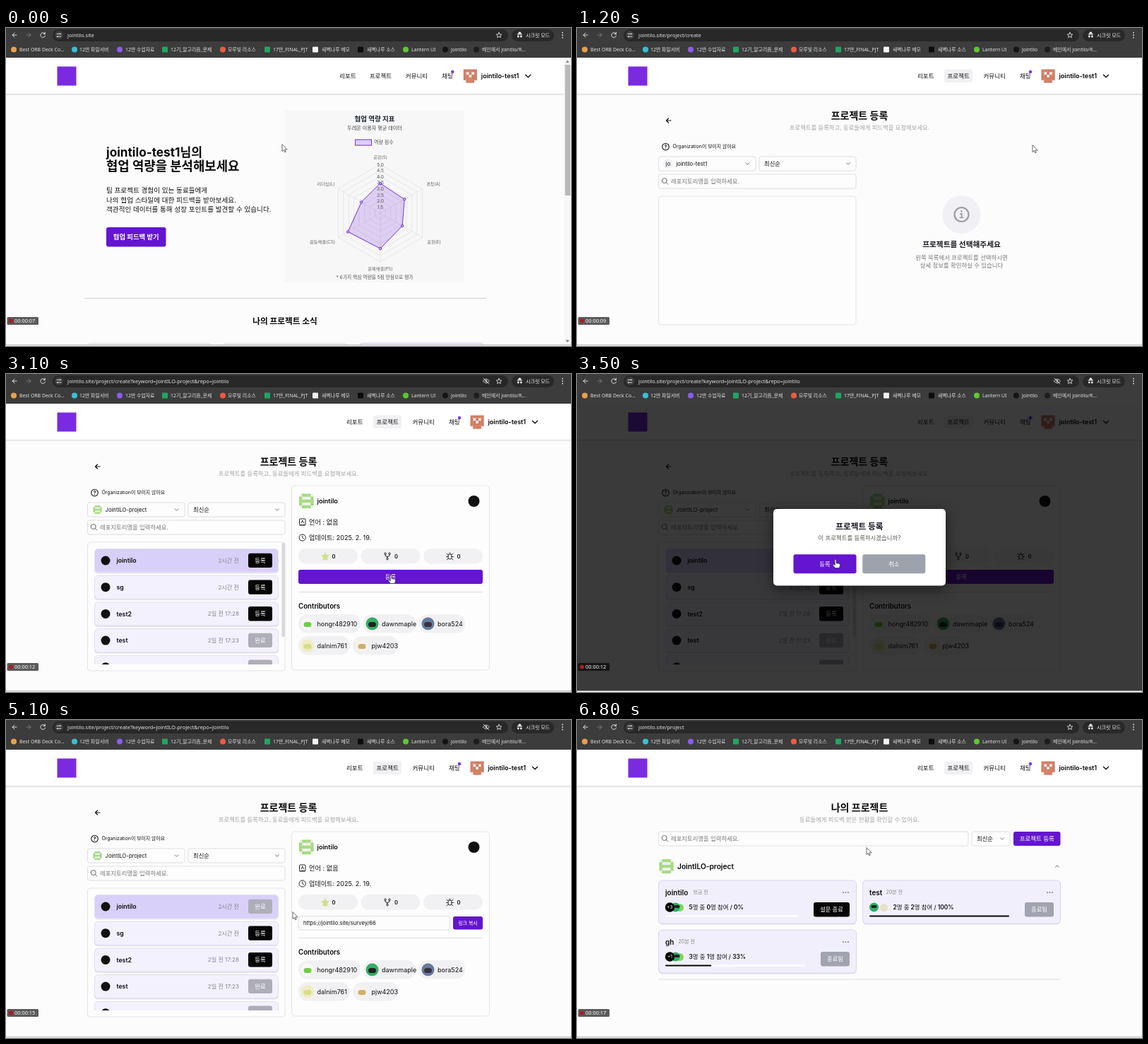
These frames come from a looping animation (800 by 450 pixels, 6.9 s). An HTML page:

```html
<!DOCTYPE html>
<html lang="ko">
<head>
<meta charset="utf-8">
<style>
html, body { margin: 0; width: 100%; height: 100%; overflow: hidden; background: #fcfcfc; }
svg { display: block; width: 800px; height: 450px; font-family: Inter, "Noto Sans CJK KR", sans-serif; }
.ui { font-family: "Noto Sans", "Noto Sans CJK KR", sans-serif; }
.raised { filter: drop-shadow(0 5px 9px rgba(0, 0, 0, .5)); }
</style>
</head>
<body>
<svg id="stage" viewBox="0 0 800 450" xmlns="http://www.w3.org/2000/svg"></svg>
<script>
const LOOP = 6900, STEP = 100;
const BRAND = 'jointilo', USER = BRAND + '-test1', ORG = 'JointILO-project', SITE = BRAND + '.site';
const PURPLE = '#6415cf', BLACK = '#050505', GREY = '#a1a3b0', LINE = '#dedee2', MUTED = '#777';
const stage = document.getElementById('stage');

// Drawing helpers
const rect = (x, y, w, h, fill, r = 0, more = '') =>
  `<rect x="${x}" y="${y}" width="${w}" height="${h}" rx="${r}" fill="${fill}" ${more}/>`;
const box = (x, y, w, h, stroke = LINE, fill = '#fdfdfd', r = 3) =>
  rect(x, y, w, h, fill, r, `stroke="${stroke}"`);
const dot = (x, y, r, fill, more = '') => `<circle cx="${x}" cy="${y}" r="${r}" fill="${fill}" ${more}/>`;
const path = (d, stroke = '#222', w = 1, fill = 'none') =>
  `<path d="${d}" fill="${fill}" stroke="${stroke}" stroke-width="${w}" stroke-linecap="round" stroke-linejoin="round"/>`;
const text = (x, y, s, size, fill = '#111', weight = 400, anchor = 'start', cls = '') =>
  `<text x="${x}" y="${y}" font-size="${size}" fill="${fill}" font-weight="${weight}" text-anchor="${anchor}" class="${cls}">${s}</text>`;
const mid = (x, y, s, size, fill, weight) => text(x, y, s, size, fill, weight, 'middle');
const ui = (x, y, s, size, fill) => text(x, y, s, size, fill, 400, 'start', 'ui');
const at = (x, y, s) => `<g transform="translate(${x} ${y})">${s}</g>`;
const button = (x, y, w, h, label, fill, size = 8.3, weight = 500) =>
  rect(x, y, w, h, fill, 3) + mid(x + w / 2, y + h / 2 + size * .36, label, size, '#fff', weight);
const chevron = (x, y, s = 2.5, w = .9, color = '#666') =>
  path(`M${x - Math.abs(s)} ${y - s / 2}l${Math.abs(s)} ${s}l${Math.abs(s)} ${-s}`, color, w);

function blocks(x, y, size, rows, color) {
  const c = size / 5;
  let s = rect(x, y, size, size, '#f0f0f0', 3);
  rows.split(' ').forEach((row, j) => [...row].forEach((v, i) => {
    if (v === '1') s += rect(x + i * c, y + j * c, c + .1, c + .1, color);
  }));
  return s;
}
const userIcon = (x, y) => blocks(x, y, 19, '11111 10101 11011 11111 01110', '#d27c62');
const orgIcon = (x, y, size) => blocks(x, y, size, '01110 10001 11111 10001 01110', '#a4da7e');

function browser(url, eye) {
  const marks = [
    [11, '#e9a04a', 0, 'Best ORB Deck Co...'], [97, '#38bfd8', 0, '12반 파일서버'],
    [161, '#8b5cf0', 0, '12반 수업자료'], [225, '#21a464', 1, '12기_알고리즘_문제'],
    [307, '#ee5b3f', 0, '모루빛 리소스'], [370, '#21a464', 1, '17반_FINAL_PJT'],
    [438, '#f4f4f4', 1, '새벽나루 메모'], [502, '#0c0c0c', 1, '새벽나루 소스'],
    [566, '#5cc832', 0, 'Lantern UI'], [622, '#141414', 0, BRAND],
    [666, '#1d1d1d', 0, `메인에서 ${BRAND}/R...`]];
  const textX = [19, 104, 169, 233, 314, 378, 447, 511, 574, 630, 674];
  let s = rect(0, 0, 800, 42, '#3c3c3c') + rect(66, 2, 645, 17, '#282828', 8.5) + rect(716, 2, 60, 17, '#292929', 8.5);
  s += path('M15 10H9M12 7l-3 3l3 3', '#ddd') + path('M29 10h6M32 7l3 3l-3 3', '#777');
  s += path('M55 8a3.4 3.4 0 1 0 .5 3M55.4 6v2.4h-2.4', '#ddd');
  s += dot(75, 10, 6, '#3c3c3c') + path('M72 8.3h3M77.4 8.3h.6M72 12h.6M75 12h3', '#ddd') + dot(76.3, 8.3, 1, '#ddd') + dot(73.4, 12, 1, '#ddd');
  s += ui(87, 12.7, url, 7.35, '#e6e6e6');
  if (eye) s += path('M675.5 10q4.5-6 9 0q-4.5 6-9 0M676 6l8 8', '#ddd', .9) + dot(680, 10, 1.4, '#ddd');
  s += path('M698 6.3l1.1 2.5 2.7.2-2.1 1.8.7 2.7-2.4-1.5-2.4 1.5.7-2.7-2.1-1.8 2.7-.2z', '#ddd', .9);
  s += path('M724 9h6.5M725.5 8.5l.8-2.5h2.2l.8 2.5', '#eee', 1, '#eee') + dot(725.3, 12, 1.4, '#eee') + dot(729.3, 12, 1.4, '#eee');
  s += ui(736, 12.7, '시크릿 모드', 7, '#eee');
  s += [6.5, 10, 13.5].map(y => dot(788, y, .9, '#ddd')).join('');
  marks.forEach(([x, c, square, label], i) => {
    s += square ? rect(x - 4, 26.5, 8, 8, c, 1) : dot(x, 30.5, 4, c);
    s += ui(textX[i], 33, label, 6.9, '#e2e2e2');
  });
  return s;
}

function ping(t) {
  const start = t < 600 ? -467 : t < 5700 ? 633 : 5650;
  const p = Math.min(1, ((t - start) % 667 + 667) % 667 / 500), e = 1 - (1 - p) ** 3;
  return dot(642, 62, 2.3 * (1 + e), '#a855f7', `opacity="${(1 - e) * .75}"`);
}

function header(t, home) {
  let s = rect(0, 93, 800, 1, '#dcdcdc') + rect(0, 94, 800, 1.5, '#f1f1f1') + rect(0, 42, 800, 51, '#fff');
  s += rect(72.5, 54.5, 27, 27, '#7a2be0');
  let nav = home ? '' : rect(520, 58.5, 40, 18.5, '#f1f1f4', 3);
  [[482, '리포트'], [524.5, '프로젝트'], [575.5, '커뮤니티'], [627, '채팅']].forEach(([x, label]) => {
    nav += text(x, 71, label, 8.5, '#111', 500);
  });
  nav += ping(t) + dot(642, 62, 2.3, '#7c3aed') + userIcon(657.5, 58.5);
  nav += text(682.5, 71.2, USER, 9, '#050505', 600) + chevron(749, 68, 3.6, 1.4, '#111');
  return s + at(home ? -9.7 : 0, 0, nav);
}

function radar() {
  const cx = 530, cy = 262;
  const spot = (r, i) => [cx + r * Math.sin(i * Math.PI / 3), cy - r * Math.cos(i * Math.PI / 3)];
  const ring = rs => 'M' + rs.map((r, i) => spot(r, i).map(v => v.toFixed(1)).join(' ')).join('L') + 'z';
  const data = [42, 39.5, 36, 50, 53, 31];
  let s = '';
  for (let k = 1; k <= 8; k++) s += path(ring(Array(6).fill(k * 8.6)), '#dcdce0', .6);
  for (let i = 0; i < 6; i++) s += path(`M${cx} ${cy}L${spot(69, i).join(' ')}`, '#dcdce0', .6);
  s += path(ring(data), '#7431d6', 1, 'rgba(116,49,214,.2)');
  data.forEach((r, i) => { const [x, y] = spot(r, i); s += dot(x, y, 1.7, '#c9b4f0', 'stroke="#7431d6"'); });
  for (let k = 1; k <= 8; k++) s += mid(cx, cy - k * 8.6 + 2.3, (1 + k / 2).toFixed(1), 6.6, '#555');
  [[530, 184.5, '공감(S)'], [605, 222.5, '경청(A)'], [606, 305, '표현(E)'], [530, 343, '문제해결(PS)'],
   [448, 305, '갈등해결(CS)'], [453, 222.5, '리더십(L)']].forEach(([x, y, label]) => { s += mid(x, y, label, 6.2, '#666'); });
  return s;
}

function home() {
  let s = text(142, 182, USER + '님의', 17.2, '#0a0a0a', 700) + text(142, 201.5, '협업 역량을 분석해보세요', 17.8, '#0a0a0a', 700);
  s += text(142, 233, '팀 프로젝트 경험이 있는 동료들에게', 9.6) + text(142, 246.7, '나의 협업 스타일에 대한 피드백을 받아보세요.', 9.6);
  s += text(142, 260.2, '객관적인 데이터를 통해 성장 포인트를 발견할 수 있습니다.', 9.6);
  s += button(142, 282, 84.5, 27.5, '협업 피드백 받기', PURPLE, 9.4, 700);
  s += rect(395, 116, 253.5, 244, '#f7f7f8', 2);
  s += mid(522, 131.7, '협업 역량 지표', 9.5, '#1f2430', 700) + mid(522, 144.3, '두레온 이용자 평균 데이터', 7.1, '#444');
  s += rect(494.5, 158, 23, 8, '#dccff4', 0, 'stroke="#7431d6"') + text(521, 164.3, '역량 점수', 7, '#555') + radar();
  s += mid(522, 355.3, '* 6가지 핵심 역량을 5점 만점으로 평가', 6.7, '#555');
  s += rect(111, 382, 569, 1, '#cfcfd2') + mid(395, 419, '나의 프로젝트 소식', 11.7, '#0a0a0a', 700);
  s += [115.5, 308, 501].map((x, i) => box(x, 446, 174.5, 20, i > 1 ? '#cfc0f2' : '#e0e0e4', i > 1 ? '#f6f2fe' : '#f2f2f4', 4)).join('');
  s += rect(790, 42, 10, 408, '#f7f7f7') + rect(791.5, 52, 7.5, 185, '#b9b9b9');
  s += path('M793 48.5l2-2.5l2 2.5z', '#777', .5, '#777') + path('M793 442l2 2.5l2-2.5z', '#777', .5, '#777');
  return s;
}

const search = w => box(115.5, 207, w, 20) + dot(123.7, 216, 3.5, 'none', 'stroke="#666"') +
  path('M126.3 218.6l2.5 2.5', '#666') + text(133, 219.7, '레포지토리명을 입력하세요.', 8.35, MUTED);
const title = (s, sub) => mid(400, 128.8, s, 14, '#0a0a0a', 700) + mid(400, 144, sub, 8.35, '#a5a5aa');

function projectCard(x, y, p) {
  let s = rect(x, y + 1.5, 280, 61, '#e3e1ea', 5) + box(x, y, 280, 61, '#dbd4ee', '#f2effd', 5);
  s += text(x + 9.5, y + 20.5, p.name, 10, '#0a0a0a', 600) + text(x + p.timeX, y + 19, p.time, 7, '#888');
  s += [261.5, 265, 268.5].map(d => dot(x + d, y + 17, .9, '#777')).join('');
  s += dot(x + 30, y + 38.5, 5.5, p.more ? '#7ed957' : '#e7dfc8') + dot(x + (p.more ? 24 : 16), y + 38, 6.5, '#35ad67');
  s += rect(x + (p.more ? 22 : 12), y + 35, 8, 4, '#222', 2);
  if (p.more) s += dot(x + 16, y + 38, 6.7, BLACK) + mid(x + 16, y + 40.3, p.more, 6.5, '#fff');
  const b = v => `<tspan font-weight="600">${v}</tspan>`;
  s += text(x + 43, y + 41, `${b(p.all)}명 중 ${b(p.done)}명 참여 / ${b(p.pct + '%')}`, 8.4, '#111', 500);
  const w = p.open ? 188 : 198;
  s += rect(x + 9.5, y + 49.5, w, 2, '#fff', 1) + rect(x + 9.5, y + 49.5, w * p.pct / 100, 2, BLACK, 1);
  return s + (p.open ? button(x + 219.5, y + 31, 51, 20.5, '설문 종료', BLACK) : button(x + 229.5, y + 31, 41, 20.5, '종료됨', GREY));
}

function projects(registered) {
  const fresh = { name: BRAND, time: '방금 전', timeX: 49, more: '+3', all: 5, done: 0, pct: 0, open: true };
  const list = [{ name: 'test', time: '20분 전', timeX: 33, all: 2, done: 2, pct: 100 },
    { name: 'gh', time: '20분 전', timeX: 28, more: '+1', all: 3, done: 1, pct: 33 }];
  if (registered) list.unshift(fresh);
  let s = title('나의 프로젝트', '동료들에게 피드백 받은 현황을 확인할 수 있어요.');
  s += at(0, -49, search(438.5)) + box(559, 158, 54, 20) + text(566, 171, '최신순', 8.3) + chevron(602, 168);
  s += button(618, 158, 66.5, 20, '프로젝트 등록', PURPLE, 8.5);
  s += orgIcon(116.5, 197, 20) + text(142, 210.7, ORG, 10.2, '#0a0a0a', 600) + chevron(680, 207, -2.5, 1);
  list.forEach((p, i) => { s += projectCard(i % 2 ? 404.5 : 115.5, i < 2 ? 227 : 297, p); });
  return s + rect(115, registered ? 366.5 : 297, 569.5, 1, '#dededf');
}

function repoList(t) {
  const rows = [[BRAND, '2시간 전'], ['sg', '2시간 전'], ['test2', '2일 전 17:28'], ['test', '2일 전 17:23'], ['gh', '2일 전 17:20']];
  let s = '';
  rows.forEach(([name, when], i) => {
    const y = 247.5 + i * 37.7, done = i > 2 || (i === 0 && t >= 5000);
    const fill = i ? '#f4f1fe' : t >= 2600 ? '#d9d0f9' : t >= 2300 ? '#ece4fc' : '#f4f1fe';
    s += rect(125, y + 1.5, 261, 33.5, '#e6e3ed', 5) + box(125.5, y, 260, 33, '#e2ddf2', fill, 5);
    s += dot(141, y + 16.5, 6.5, '#111') + text(156.5, y + 19.6, name, 8.7, '#0a0a0a', 600);
    s += text(330, y + 19.3, when, 8.1, '#85858d', 400, 'end');
    s += button(343, y + 6.2, 34, 20.3, done ? '완료' : '등록', done ? '#aeaeb9' : BLACK);
  });
  // the scrollbar shows only until the list is left for good
  return `<clipPath id="listClip"><rect x="116" y="239" width="274" height="172"/></clipPath><g clip-path="url(#listClip)">${s}</g>` +
    (t < 5000 ? rect(390.5, 239, 4.5, 133, '#d9d9dd', 2) : '');
}

function detail(done) {
  let s = box(404.5, 158, 280, 261, '#e4e4e8', '#fdfdfd', 5) + orgIcon(415, 169.5, 20.5);
  s += text(440.5, 182.7, BRAND, 9.1, '#0a0a0a', 600) + dot(662.5, 180, 8, '#111');
  s += box(415.5, 205, 8.5, 8.5, '#222', 'none', 1) + path('M418 211l1.8-4l1.8 4M415.5 214h8', '#222', .9);
  s += text(429, 212.5, '언어 : 없음', 9.2) + dot(419.7, 231.5, 4.6, 'none', 'stroke="#222"') + path('M419.7 229v2.7l1.8 1');
  s += text(429, 234.7, '업데이트: 2025. 2. 19.', 9.1);
  [414, 502.5, 591].forEach(x => { s += rect(x, 247, 84, 21.5, '#f1f1f3', 10.7) + text(x + 47.5, 260.5, '0', 7.6, '#111', 600); });
  s += path('M452 253l1.7 3.2 3.5.6-2.5 2.5.5 3.5h-6.4l.5-3.5-2.5-2.5 3.5-.6z', '#cfe28c', 1, '#cfe28c');
  s += path('M537 255.5v1.5q0 1 3 1.3q3-.3 3-1.3v-1.5M540 258.3v2') + [[537, 254.3], [543, 254.3], [540, 261.6]].map(([x, y]) => dot(x, y, 1.3, '#f1f1f3', 'stroke="#222"')).join('');
  s += rect(626, 255, 5, 7, 'none', 2.5, 'stroke="#222"') + path('M624 254l2 2M633 254l-2 2M623.5 258.5h2.5M631 258.5h2.5M624 263l2-2M633 263l-2-2M627 254q1.5-2 3 0', '#222', .9);
  s += done ? box(414.5, 277.5, 214, 19.5) + text(421, 290, `https://${SITE}/survey/66`, 7.6) + button(633, 278, 42, 18.5, '링크 복사', PURPLE, 7)
    : button(414, 277, 261, 20, '등록', PURPLE);
  s += rect(414, 308, 261, 1, '#dedee2') + text(414, 331.7, 'Contributors', 9.7, '#0a0a0a', 600);
  [[414, 340, 88, 'hongr482910', '#f8f8f5', '#6fce45'], [505.5, 340, 75, 'dawnmaple', '#35ad67', '#222'], [584.5, 340, 65.5, 'bora524', '#667a9c', '#3a3344'],
   [414, 371, 73, 'dalnim761', '#f0ecc0', '#d5df87'], [491, 371, 65, 'pjw4203', '#f6f3e8', '#cfae6c']].forEach(([x, y, w, name, bg, fg]) => {
    s += rect(x, y, w, 26.5, '#f1f1f3', 13.2) + dot(x + 13, y + 13.3, 9, bg) + rect(x + 7.5, y + 11, 11, 7, fg, 3.5) + text(x + 26.5, y + 16.5, name, 9);
  });
  return s;
}

function create(t) {
  const org = t >= 2000, picked = t >= 2600;
  let s = title('프로젝트 등록', '프로젝트를 등록하고, 동료들에게 피드백을 요청해보세요.');
  s += path('M133 131h-6.5M129.5 128l-3 3l3 3', '#111', 1.2);
  s += dot(125.5, 168, 4.8, 'none', 'stroke="#111" stroke-width="1.1"') + mid(125.5, 170.6, '?', 7, '#111', 700);
  s += text(135.5, 170.4, 'Organization이 보이지 않아요', 6.9);
  s += box(115.5, 182, 137.5, 20, t >= 1800 && !picked ? '#333' : LINE);
  s += org ? orgIcon(123.5, 186, 12) : dot(129, 192, 7, '#f1f1f4') + mid(129, 194.6, 'jo', 7.5);
  s += text(140.5, 194.9, org ? ORG : USER, 7.7) + chevron(241.5, 192) + box(258, 182, 137, 20) + text(265, 195, '최신순', 8.3) + chevron(384, 192);
  s += search(279.5) + box(115.5, 238, 279.5, 182, '#e4e4e8', '#fdfdfd', 4);
  if (t >= 2100) s += repoList(t);
  if (picked) return s + detail(t >= 5000);
  s += dot(544.5, 264, 27, '#f1f1f5') + dot(544.5, 264, 10, 'none', 'stroke="#9b9ba5" stroke-width="2.2"');
  s += path('M543 263h1.7v5M542.5 268.3h4', '#9b9ba5', 1.8) + dot(544.3, 259.5, 1.3, '#9b9ba5');
  s += mid(544.5, 310.4, '프로젝트를 선택해주세요', 10.7, '#1a1a22', 700);
  return s + mid(544.5, 327.5, '왼쪽 목록에서 프로젝트를 선택하시면', 8.4, MUTED) + mid(544.5, 338.7, '상세 정보를 확인하실 수 있습니다', 8.4, MUTED);
}

function modal(t) {
  const a = Math.max(0, Math.min(1, (t - 3100) / 150, (5080 - t) / 150));
  if (!a) return '';
  return `<g opacity="${a}">` + rect(0, 42, 800, 406, '#000', 0, 'opacity=".77"') + rect(278, 191, 244, 108.5, '#fff', 5, 'class="raised"') +
    mid(400, 220, '프로젝트 등록', 11.7, '#151520', 700) + mid(400, 234.5, '이 프로젝트를 등록하시겠습니까?', 8.4, '#555') +
    button(306.5, 255.3, 89, 27, '등록', PURPLE) + button(404.3, 255.3, 89, 27, '취소', '#9da2ad') + '</g>';
}

// time, x, y of the pointer tip
const track = [[0, 391, 165], [100, 396, 160], [450, 532, 67], [650, 532, 67], [1000, 645, 166], [1400, 645, 166], [1750, 200, 189],
  [1850, 200, 189], [2000, 195, 222], [2100, 195, 222], [2350, 235, 279], [2600, 235, 279], [2950, 545, 284], [3100, 545, 284],
  [3400, 366, 262], [4300, 366, 262], [4700, 404, 271], [5100, 406, 272], [5500, 546, 67], [6000, 546, 67], [6700, 410, 181], [6900, 410, 181]];
const handTimes = [[400, 700], [2300, 2800], [2900, 3200], [3300, 4600], [5500, 6100]];

function pointer(t) {
  const i = track.findIndex((k, n) => n && t < k[0]), [t0, x0, y0] = track[i - 1], [t1, x1, y1] = track[i];
  const p = (t - t0) / (t1 - t0), e = p * p * (3 - 2 * p);
  const hand = handTimes.some(([a, b]) => t >= a && t < b);
  return at(x0 + (x1 - x0) * e, y0 + (y1 - y0) * e, hand
    ? path('M-1 1q1-1.5 2 0v4.5l4.5 1q1.3.5 1 2l-1 4h-6l-3.5-4.5q0-1.7 2-.5l1 1z', '#333', .8, '#fff')
    : path('M0 0v9.5l2.2-2 1.5 3.3 1.5-.7-1.5-3.2h3z', '#444', .8, '#fff'));
}

const bubble = t => (t >= 400 && t < 900) || (t >= 5500 && t < 6400)
  ? rect(-3, 436, 89, 13, '#333', 2) + ui(3, 445, `https://${SITE}/project`, 6.6, '#e8e8e8') : '';

function timer(t) {
  const sec = String(Math.floor(7.55 + t * .0015)).padStart(2, '0');
  return rect(1.5, 409, 44.5, 11, 'rgba(0,0,0,.64)', 1.5) + dot(7, 414.6, 3, '#a51d2a') + ui(12, 417.3, `00:00:${sec}`, 7.4, '#fff');
}

function draw(t) {
  const isHome = t < 600, isCreate = t >= 1100 && t < 5700;
  let url = SITE;
  if (!isHome) url += '/project';
  if (isCreate) url += '/create';
  if (isCreate && t >= 2600) url += `?keyword=${ORG}&amp;repo=${BRAND}`;
  stage.innerHTML = rect(0, 0, 800, 450, '#fcfcfc') + header(t, isHome) +
    (isHome ? home() : isCreate ? create(t) : projects(t >= 5700)) +
    modal(t) + browser(url, isCreate && t >= 2000) +
    rect(0, 448, 800, 1, '#b5b5b8') + rect(0, 449, 800, 1, '#f8f8f8') +
    bubble(t) + timer(t) + pointer(t);
}

const begin = performance.now();
let last = -1;
function tick() {
  const t = Math.floor((performance.now() - begin) % LOOP / STEP) * STEP;
  if (t !== last) draw(last = t);
  requestAnimationFrame(tick);
}
tick();
</script>
</body>
</html>
```
